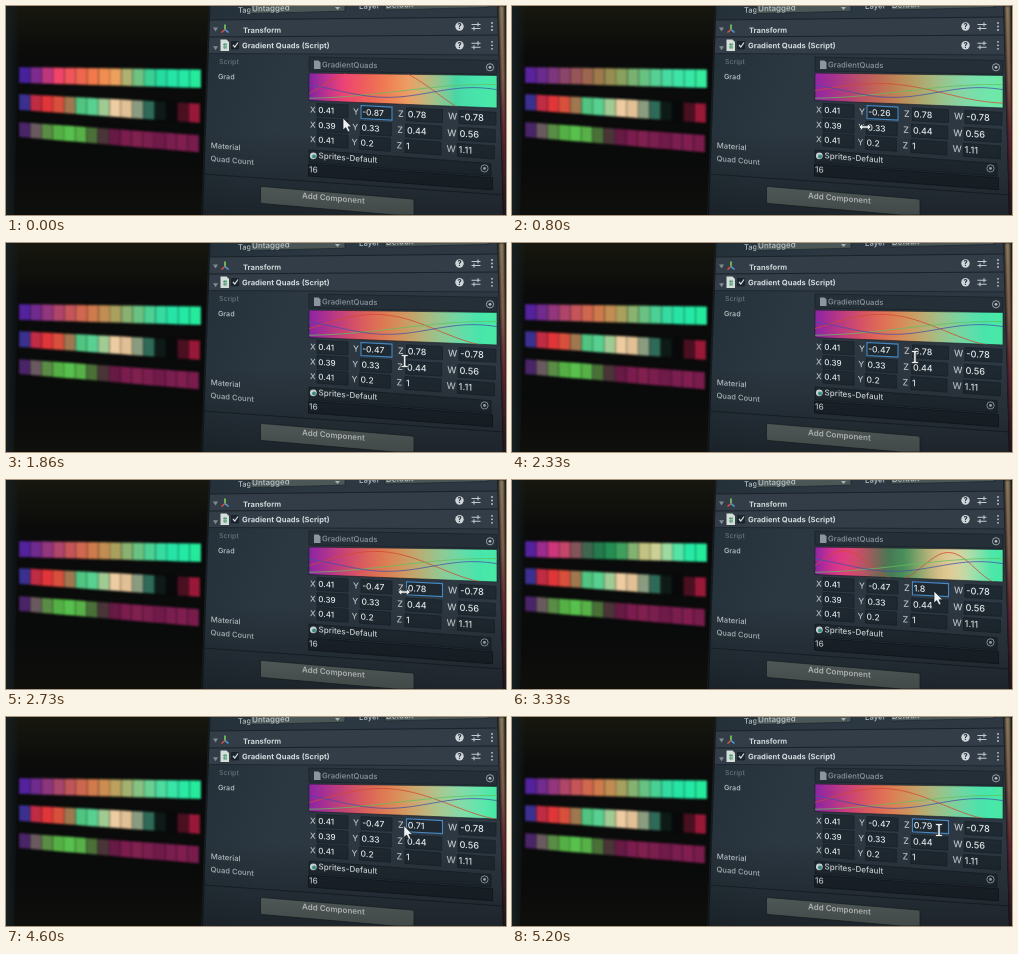
These frames come from a looping animation (500x209 px, 5.27 s). An HTML page:

```html
<!DOCTYPE html>
<html lang="en">
<head>
<meta charset="utf-8">
<title>Gradient inspector</title>
<style>
html, body { margin: 0; width: 100%; height: 100%; overflow: hidden; background: #0a0e11; }
svg { display: block; width: 100vw; height: 100vh; }
text { font-family: Inter, Roboto, sans-serif; white-space: pre; }
#quads { filter: blur(.9px); }
#panel { filter: blur(.3px); }
#rim { filter: blur(1.2px); }
</style>
</head>
<body>
<svg id="stage" viewBox="0 0 500 209">
  <defs>
    <linearGradient id="room" x1="0" y1="0" x2="0" y2="1">
      <stop offset="0" stop-color="#17170f"/><stop offset=".25" stop-color="#0a0b0a"/>
      <stop offset=".75" stop-color="#090a0a"/><stop offset="1" stop-color="#0f100c"/>
    </linearGradient>
    <linearGradient id="bezel">
      <stop offset="0" stop-color="#161f22"/><stop offset="1" stop-color="#161f22" stop-opacity="0"/>
    </linearGradient>
    <linearGradient id="slate" x1="0" y1="0" x2="1" y2=".25">
      <stop offset="0" stop-color="#243038"/><stop offset=".35" stop-color="#2b3741"/><stop offset="1" stop-color="#2e3842"/>
    </linearGradient>
    <linearGradient id="fade" x1="0" y1="0" x2="0" y2="1">
      <stop offset=".6" stop-opacity="0"/><stop offset="1" stop-opacity=".35"/>
    </linearGradient>
    <linearGradient id="glow" x1="0" y1="0" x2="0" y2="1">
      <stop offset="0" stop-color="#8a7a60"/><stop offset=".35" stop-color="#84604c"/>
      <stop offset=".6" stop-color="#6a2c34"/><stop offset="1" stop-color="#2a1a1e"/>
    </linearGradient>
    <linearGradient id="ramp"></linearGradient>
    <clipPath id="strip"><path d="M303 67L491 69.5V102L303 94.5Z"/></clipPath>
  </defs>
  <path d="M0 0H500V209H0Z" fill="url(#room)"/>
  <path d="M0 0H14L8 209H0Z" fill="url(#bezel)"/>
  <g id="quads"></g>
  <g id="panel"></g>
  <path id="rim" d="M493 0H498L501 209H498Z" fill="url(#glow)"/>
  <g id="cursor"></g>
</svg>
<script>
const LOOP = 5270, STEP = 66.6, TAU = Math.PI * 2;
const $ = id => document.getElementById(id);
const panel = $('panel');

function add(parent, tag, attrs, text) {
  const el = document.createElementNS('http://www.w3.org/2000/svg', tag);
  for (const k in attrs) el.setAttribute(k, attrs[k]);
  if (text) el.textContent = text;
  parent.appendChild(el);
  return el;
}
const shape = (d, fill, stroke = 'none', width = 1) =>
  add(panel, 'path', { d, fill, stroke, 'stroke-width': width });
const label = (x, y, slope, str, size = 7.8, fill = '#bcc5c8', weight = 500) =>
  add(panel, 'text', { transform: `matrix(1 ${slope} 0 1 ${x} ${y})`, 'font-size': size, fill, 'font-weight': weight }, str);
const slab = (x, y, w, h, slope, fill, stroke, width) =>
  shape(`M${x} ${y}l${w} ${w * slope}v${h}l${-w} ${-w * slope}z`, fill, stroke, width);

// Inspector background and headers
shape('M204 0H492L497 209H196Z', 'url(#slate)');
shape('M203 14L492 11V29L202 31Z', '#323d47');
shape('M202 31L492 29V48L201 47Z', '#323d47');
shape('M203 14L492 11M202 31L492 29', 'none', '#1a2128');
shape('M201 47.5L492 49', 'none', '#1c252c', .8);
shape('M203.5 0L196 209', 'none', '#151b1e', 2);
shape('M492 0L498 209', 'none', '#12171c', 2);

// Tag row
label(232, 6.8, -.03, 'Tag', 7.4);
slab(245, -6, 94, 13.5, -.025, '#4b5757', '#1c252c', .7);
label(246, 5.6, -.03, 'Untagged', 8);
label(353, 3, -.03, 'Layer', 7.8);
slab(379, -9, 103, 13, -.025, '#4b5757', '#1c252c', .7);
label(380, 2, -.03, 'Default', 8);
shape('M329 1h5l-2.5 3z', '#aab3ba');

// Component headers
for (const y of [20.5, 39.3]) {
  shape(`M207 ${y + 1}h5l-2.5 4z`, '#808b90');
  add(panel, 'circle', { cx: 453.5, cy: y, r: 4.2, fill: '#cfd6da' });
  label(451.4, y + 2.7, 0, '?', 7.2, '#2c343f', 800);
  shape(`M465.5 ${y - 2}h9M465.5 ${y + 2}h9M472 ${y - 4}v4M468 ${y}v4`, 'none', '#c3cbd0', 1.1);
  for (const d of [-3.5, 0, 3.5]) add(panel, 'circle', { cx: 486, cy: y + d, r: .9, fill: '#c3cbd0' });
}
shape('M219 23.5V18.5', 'none', '#7ed05a', 1.6);
shape('M219 23.5L215.5 26.5', 'none', '#e0503f', 1.6);
shape('M219 23.5L222.5 26.5', 'none', '#4aa0e0', 1.6);
label(237, 27, -.01, 'Transform', 7.5, '#cfd7d8', 700);
shape('M214.5 33.5h6l2.5 2.5v9h-8.5z', '#d5ded8');
shape('M217 38.5h4M217 41h4M218.3 37v6M220 37v6', 'none', '#4b9a72', .8);
slab(225.5, 35.5, 7, 7.5, 0, '#1c252c', '#141a20', .6);
shape('M227 39l1.8 2L232 36.5', 'none', '#d8dfe3', 1.2);
label(236, 42.2, .002, 'Gradient Quads (Script)', 7.6, '#d3dade', 700);

// Field labels
label(213, 58, .02, 'Script', 7, '#66737a');
label(212, 73, .03, 'Grad', 7.2);
label(204.8, 142, .08, 'Material', 7.7);
label(204.5, 155, .09, 'Quad Count', 7.6);

// Object field
slab(303, 51, 188, 14, .018, '#252f37', '#1a2329', .8);
shape('M308 54.5h4.5l2 2v6.5h-6.5z', '#8c969e');
label(316, 61.3, .015, 'GradientQuads', 7.7, '#8b979d');

function target(x, y) {
  add(panel, 'circle', { cx: x, cy: y, r: 3.6, fill: 'none', stroke: '#b4bdc2', 'stroke-width': .8 });
  add(panel, 'circle', { cx: x, cy: y, r: 1.4, fill: '#b4bdc2' });
}
target(484, 61.3);

// Gradient strip with channel curves
shape('M303 67L491 69.5V102L303 94.5Z', 'url(#ramp)', '#161c23', .6);
const curves = ['#d2492f', '#62c060', '#4450a8'].map(stroke => add(panel, 'polyline',
  { fill: 'none', stroke, 'stroke-width': .9, 'stroke-opacity': .85, 'clip-path': 'url(#strip)' }));
const ramp = $('ramp');
const STOPS = 32;
const stops = Array.from({ length: STOPS + 1 }, (_, i) => add(ramp, 'stop', { offset: i / STOPS }));

// Coefficient grid: one row per colour channel, nearer columns larger
const coef = [[.41, -.47, .78, -.78], [.39, .33, .44, .56], [.41, .2, 1, 1.11]];
const rowY = [103.5, 118.5, 133], rowSlope = [.05, .062, .073];
const colX = [304, 347, 392, 442], boxX = [311, 355, 400.5, 453], boxW = [31, 31, 36, 37];
const CELL_EDGE = '#19222a';
const cells = coef.map((vals, r) => vals.map((v, c) => {
  const s = rowSlope[r], shift = c ? -r * .8 : 0, size = 8.1 + c * .38;
  const at = x => rowY[r] + (x - 304) * s;
  const lx = colX[c] + shift, bx = boxX[c] + shift;
  label(lx, at(lx) + 2.9, s, 'XYZW'[c], size);
  const box = slab(bx, at(bx) - 6.5, boxW[c], 13, s, '#1f2931', CELL_EDGE, .8);
  return { box, text: label(bx + 1.2, at(bx) + 3, s, String(v), size, '#e2e8ea', 500) };
}));

// Material, count and button
slab(303, 144, 182, 12.5, .075, '#212b33', '#171f25', .8);
add(panel, 'circle', { cx: 307.3, cy: 149.8, r: 3.4, fill: '#d9e5e4' });
add(panel, 'circle', { cx: 308, cy: 150.4, r: 2, fill: '#3d9c98' });
label(312.5, 152.3, .08, 'Sprites-Default', 8.1, '#dce3e5', 500);
target(478.5, 162.4);
slab(302.5, 158, 184, 12, .075, '#1c252d', '#12191f', .8);
label(303, 166.2, .06, '16', 8.3, '#dce3e5', 500);
shape('M197 168L497 189', 'none', '#1a2228', .9);
shape('M256 180.5L406 193Q408 193.2 408 195V209H389L256 197.5Q254.5 197.4 254.5 195.5V182Q254.5 180.4 256 180.5Z', '#65716f', '#1b2429', .7);
label(296, 192.3, .085, 'Add Component', 8, '#eef2f2', 600);
shape('M202 0H500V209H196Z', 'url(#fade)');

// Preview strips of sixteen quads; the lower two keep fixed colours
const hex = str => str.split(' ').map(h => '#' + h);
const bands = [
  { left: [61, 77], right: [63.5, 82] },
  { left: [88, 104], right: [97.5, 117],
    fills: hex('3a3090 c02c44 e0363a d8503c a07850 50c480 58d090 a0cc94 eccca0 e0c094 8a9c80 2f6a58 0e1a16 09090b 4a1022 981838') },
  { left: [116, 131], right: [129, 146.5],
    fills: hex('4a2468 6a5a60 5a8c46 54b044 58c04c 58b048 4a7038 4a3438 661a44 7a1c4e 80204e 7a1e4e 701a4a 7a1e50 801e50 781c4c') }
];
const lerp = (a, b, k) => a + (b - a) * k;
bands.forEach((band, n) => {
  const edge = (i, side) => {
    const k = i / 16;
    return `${lerp(13, 195 - n, k)} ${lerp(band.left[side], band.right[side], k)}`;
  };
  band.quads = Array.from({ length: 16 }, (_, i) => add($('quads'), 'path', {
    d: `M${edge(i, 0)}L${edge(i + 1, 0)}L${edge(i + 1, 1)}L${edge(i, 1)}Z`,
    fill: band.fills ? band.fills[i] : 'none',
    stroke: '#0a0c10', 'stroke-width': .5, 'stroke-opacity': .35
  }));
});

// Pointer shapes, each centred on its own hot area
const pointers = {
  arrow: 'M-3 -7V5L-.2 2.6L2 7L4 6L2 1.8H5.6Z',
  scrub: 'M-6 0L-2.5 -3.5V-1.2H2.5V-3.5L6 0L2.5 3.5V1.2H-2.5V3.5Z',
  beam: 'M-3.5 -6.5H3.5V-4.5H1.2V4.5H3.5V6.5H-3.5V4.5H-1.2V-4.5H-3.5Z'
};
const cursor = add($('cursor'), 'path', { fill: '#eef2f3', stroke: '#1a1f24', 'stroke-width': .7 });

// Each track is a list of [time, value, ...]
const yTrack = [[0, -.87], [130, -.84], [800, -.26], [950, -.24], [1500, -.47], [LOOP, -.47]];
const zTrack = [[0, .78], [2760, .78], [3300, 1.8], [3400, 1.8], [4020, .31], [4150, .31], [4750, .79], [LOOP, .79]];
const path = [[0, 340, 119], [800, 353, 121], [950, 353, 121], [1500, 348, 120], [1830, 400, 118],
  [2300, 403, 114], [2700, 398, 112], [3300, 425, 118], [3400, 425, 118], [4020, 391, 119],
  [4150, 390, 118], [4750, 403, 115], [5180, 427, 113], [LOOP, 427, 113]];
const modes = [[0, 'arrow'], [560, 'scrub'], [1650, 'beam'], [2450, 'scrub'], [3000, 'arrow'], [4760, 'beam']];

function sample(track, t) {
  const i = Math.max(1, track.findIndex(k => k[0] > t));
  const a = track[i - 1], b = track[i];
  const k = (t - a[0]) / (b[0] - a[0]), e = k * k * (3 - 2 * k);
  return a.slice(1).map((v, n) => lerp(v, b[n + 1], e));
}
const clamp = v => Math.min(1, Math.max(0, v));
const channel = (n, u) => {
  const [x, y, z, w] = coef[n];
  return x + y * Math.cos(TAU * (z * u + w));
};
const rgb = c => `rgb(${c.map(v => Math.round(Math.min(255, v)))})`;
const palette = u => [0, 1, 2].map(n => clamp(channel(n, u)));
function stripColour(u) {
  const [r, g, b] = palette(u);
  return rgb([72 + 166 * r ** .8, 12 + 306 * g, 20 + 225 * b ** .8]);
}
function quadColour(u) {
  const [r, g, b] = palette(u);
  return rgb([36 + 204 * r ** 1.3, 8 + 315 * g, 15 + 230 * b ** .85]);
}

function draw(t) {
  [coef[0][1]] = sample(yTrack, t);
  [coef[0][2]] = sample(zTrack, t);
  const active = t < 2660 ? 1 : 2;
  [1, 2].forEach(c => {
    const { box, text } = cells[0][c];
    text.textContent = parseFloat(coef[0][c].toFixed(2));
    box.setAttribute('stroke', c === active ? '#4488c4' : CELL_EDGE);
    box.setAttribute('stroke-width', c === active ? 1.1 : .8);
  });

  stops.forEach((s, i) => s.setAttribute('stop-color', stripColour(i / STOPS)));
  curves.forEach((line, n) => {
    const pts = [];
    for (let i = 0; i <= 60; i++) {
      const u = i / 60;
      pts.push(`${303 + 188 * u},${lerp(94.5 + 7.5 * u, 67 + 2.5 * u, channel(n, u)).toFixed(2)}`);
    }
    line.setAttribute('points', pts.join(' '));
  });
  bands[0].quads.forEach((q, i) => q.setAttribute('fill', quadColour(i / 15)));

  const [cx, cy] = sample(path, t);
  cursor.setAttribute('d', pointers[modes.filter(m => m[0] <= t).pop()[1]]);
  cursor.setAttribute('transform', `translate(${cx} ${cy})`);
}

const start = performance.now();
function tick() {
  const t = (performance.now() - start) % LOOP;
  draw(Math.floor(t / STEP) * STEP);
  requestAnimationFrame(tick);
}
tick();
</script>
</body>
</html>
```
